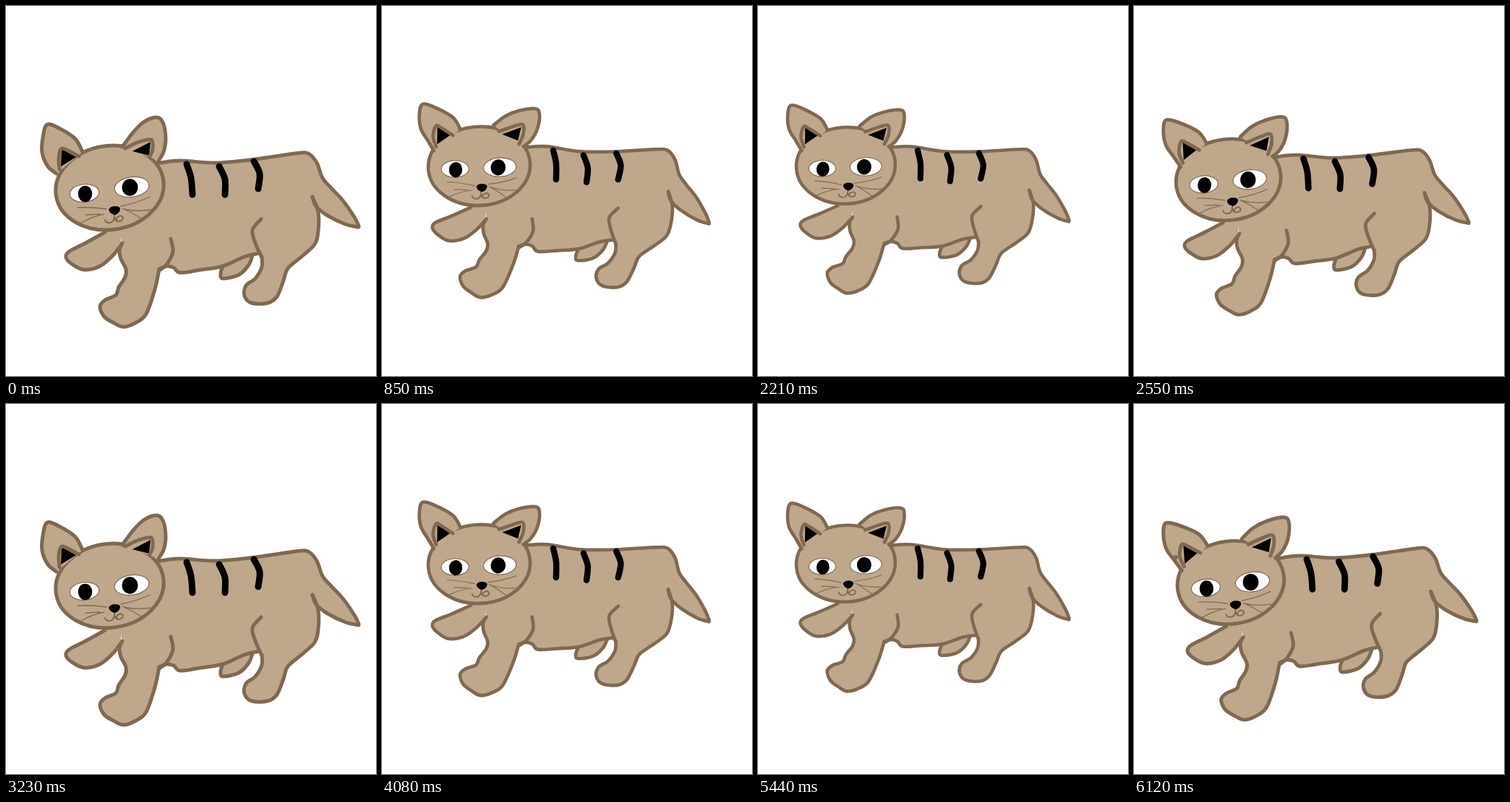
An HTML page that plays this animation: 512x512 px, repeating every 6460 ms.

```html
<!DOCTYPE html>
<html lang="en">
<head>
<meta charset="utf-8">
<title>Pouncing cat</title>
<style>
  html, body { margin: 0; width: 100%; height: 100%; overflow: hidden; background: #fff; }
  svg { display: block; width: 100vw; height: 100vh; }
  #cat { fill: none; stroke: #7f6950; stroke-width: 5; stroke-linecap: round; stroke-linejoin: round; }
  .skin { fill: #bfa78c; }
  .bare { stroke: none; }
  .thin { stroke-width: 1.3; }
  .ink { fill: #000; stroke: none; }
  .stripe { stroke: #000; stroke-width: 9; }
</style>
</head>
<body>
<svg viewBox="0 0 512 512">
  <g id="cat">
    <g id="body"></g>
    <ellipse class="skin" cx="143.5" cy="251.5" rx="75" ry="58" transform="rotate(-8 143.5 251.5)"/>
    <g id="ears"></g>
    <g id="face">
      <g stroke-width="1.2">
        <ellipse cx="108.5" cy="259" rx="20.3" ry="12.3" fill="#fff" transform="rotate(-6 108.5 259)"/>
        <ellipse cx="174" cy="250.5" rx="24" ry="13.8" fill="#fff" transform="rotate(-8 174 250.5)"/>
      </g>
      <ellipse class="ink" cx="109.5" cy="260" rx="9.8" ry="11.3"/>
      <ellipse class="ink" cx="171.5" cy="251" rx="11" ry="11.8"/>
      <path class="thin" d="M99 279Q118 278 139 281M104 300Q120 291 136 288M110 289L130 288
        M159 277Q183 272 199 264M161 280Q175 286 187 294M163 281Q180 285 200 282"/>
      <path stroke-width="2" d="M150 288L150 292Q149 300 143 300Q138 300 137 296M150 292
        Q151 298 156 298Q162 297 162 293Q160 289 156 291Q152 293 153 297"/>
      <path class="ink" d="M142 282Q144 277 151 277Q158 277 158 281Q157 287 151 289Q144 288 142 282Z"/>
    </g>
    <circle id="dot" cx="66.5" cy="216" r="3" fill="#7f6950" stroke="none"/>
  </g>
</svg>
<script>
const STEP = 170, SLOTS = 19;
const $ = id => document.getElementById(id);

function add(parent, cls, d) {
  const p = document.createElementNS("http://www.w3.org/2000/svg", "path");
  p.setAttribute("class", cls);
  if (d) p.setAttribute("d", d);
  parent.appendChild(p);
  return p;
}

// Smooth curve through points given as "x,y x,y ..."
const points = s => s.split(" ").map(p => p.split(",").map(Number));
function curve(pts) {
  let d = "M" + pts[0];
  for (let i = 0; i < pts.length - 1; i++) {
    const a = pts[i - 1] || pts[i], b = pts[i], c = pts[i + 1], e = pts[i + 2] || c;
    d += `C${b.map((v, k) => v + (c[k] - a[k]) / 6)} ${c.map((v, k) => v - (e[k] - b[k]) / 6)} ${c}`;
  }
  return d;
}
const line = s => curve(points(s));

const back = line("208,218 240,214 290,217 345,212 400,204 418,204 430,217 438,238 450,252 466,269 482,292 488,304");
const tail = line("488,306 470,302 445,290 429,277 424,264");
const haunch = line("424,264 432,285 432,312 427,330 410,346 390,363 384,380 375,402 362,411 340,411 330,401 332,387 345,377 354,361 354,347");
const belly = line("351,342 330,347 300,360 270,365 241,369 232,362 222,360 212,364");
const leg = line("212,364 206,392 194,426 180,438 163,444 150,439 136,430 130,416 137,407 152,400 156,389 165,375 166,364 159,350 157,337 161,328");
const paw = line("137,313 110,328 87,340 83,348 91,357 108,365 130,360 147,346 159,331");
const body = $("body");
add(body, "skin", line("342,342 336,358 322,372 300,377 297,370 300,360"));
const join = d => d.replace("M", "L");
add(body, "skin bare", back + [tail, haunch, belly, leg].map(join).join("") + "L150 280Z");
add(body, "skin bare", paw + "L160 290Z");
for (const d of [back, tail, haunch, belly, leg, paw]) add(body, "", d);
add(body, "", line("354,348 345,328 341,310 353,295"));
add(body, "", line("228,322 231,340 222,358 212,366"));
for (const s of ["250,219 256,238 258,261", "295,222 303,240 303,261", "343,215 351,232 349,253"])
  add(body, "stripe", line(s));

// Each ear part has a perked and a relaxed shape
const earParts = [
  ["skin", "70,232 58,222 50,203 51,182 57,164 75,170 96,184 106,202",
           "75,235 65,221 53,204 49,182 53,168 73,172 99,184 111,200"],
  ["ink", "77,198 97,209 76,222", "77,199 97,210 79,225"],
  ["", "74,226 73,211 76,198 84,199 101,208", "78,229 72,214 75,198 84,201 101,210"],
  ["skin", "161,195 175,176 190,161 208,154 217,161 221,183 218,202 211,214",
           "159,190 175,175 195,165 218,160 225,167 224,189 216,207 206,217"],
  ["ink", "175,201 200,188 198,207", "173,202 200,189 197,209"],
  ["", "165,197 184,188 201,185 203,198 199,208", "168,198 188,189 202,185 204,199 199,214"]
].map(([cls, perked, calm]) => ({
  el: add($("ears"), cls), cls, perked: points(perked), calm: points(calm)
}));

function drawEars(w) {
  for (const part of earParts) {
    const pts = part.calm.map((p, i) => p.map((v, k) => v + (part.perked[i][k] - v) * w));
    part.el.setAttribute("d", part.cls === "ink" ? "M" + pts.join("L") + "Z" : curve(pts));
  }
}

// slot, x, y, scale, turn, ear perk; then the easing that leads here
const lin = u => u, easeIn = u => u * u, easeOut = u => u * (2 - u);
const keys = [
  [[0, 250, 218, 1, 0, 1], lin],
  [[5, 237, 199, .94, 5.1, 0], easeIn],
  [[6, 224, 181.5, .919, 5.1, 0], lin],
  [[7, 203, 167.4, .889, 5.1, 0], lin],
  [[10, 204, 167.4, .888, 5.1, 0], lin],
  [[11, 204, 167.4, .888, 5.1, 0], lin],
  [[13, 221, 199, .913, 5.1, 0], lin],
  [[17, 239, 214, .987, 0, 0], easeOut],
  [[18, 239, 214, .987, 0, 0], lin]
];

function pose(slot) {
  const i = Math.max(1, keys.findIndex(k => k[0][0] >= slot));
  const a = keys[i - 1][0], [b, ease] = keys[i];
  const u = ease((slot - a[0]) / (b[0] - a[0]));
  return a.map((v, k) => v + (b[k] - v) * u);
}

let shown = -1;
function draw(ms) {
  const slot = Math.floor(ms / STEP) % SLOTS;
  if (slot !== shown) {
    shown = slot;
    const [, x, y, scale, turn, perk] = pose(slot);
    $("cat").setAttribute("transform",
      `translate(${x} ${y}) rotate(${turn}) scale(${scale}) translate(-250 -218)`);
    $("dot").setAttribute("visibility", slot >= 17 ? "visible" : "hidden");
    drawEars(perk);
  }
}

const start = performance.now();
function tick() {
  draw(performance.now() - start);
  requestAnimationFrame(tick);
}
tick();
</script>
</body>
</html>
```
